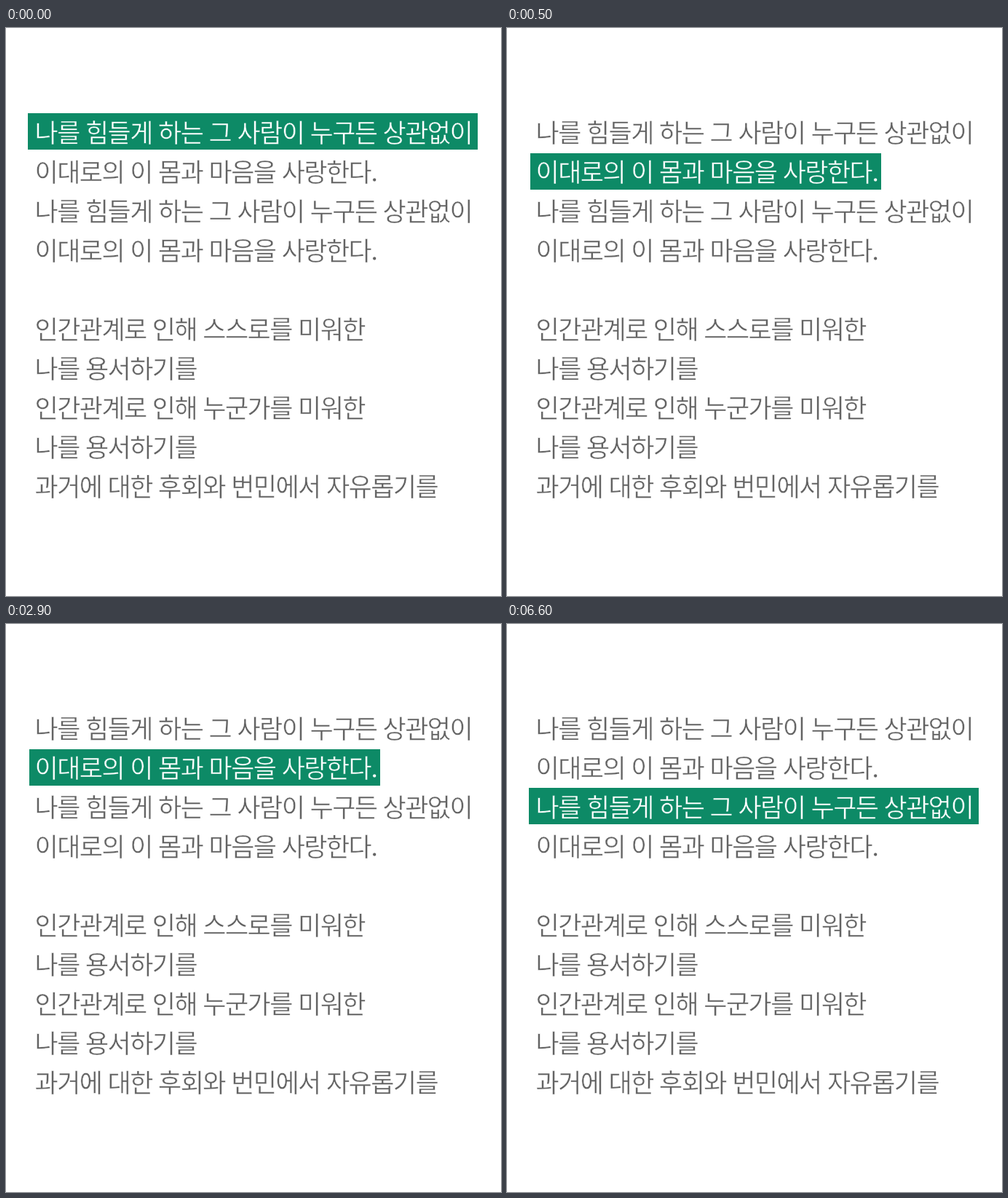
An HTML page that plays this animation: 680x780 px, repeating every 8 s.

```html
<!DOCTYPE html>
<html lang="ko">
<head>
<meta charset="utf-8">
<title>따라 읽기</title>
<style>
  html, body { margin: 0; width: 100%; height: 100%; overflow: hidden; background: #fff; }
  svg { display: block; width: 680px; height: 780px; --paper: #fff; --ink: #636363; }
  g { --paper: #0d8a66; --ink: #fff; }
  /* The paper-coloured outline thins the letters to a lighter weight. */
  text {
    font: 300 35px "Noto Sans CJK KR", "Noto Sans CJK", "Noto Sans KR", sans-serif;
    letter-spacing: -0.045em;
    fill: var(--ink);
    stroke: var(--paper);
    stroke-width: 0.45px;
  }
  rect { fill: var(--paper); }
</style>
</head>
<body>
<svg id="stage" viewBox="0 0 680 780"></svg>
<script>
const LOOP = 8000, LEFT = 39.5, FIRST_BASELINE = 156.6, LINE_HEIGHT = 54;
const lines = [
  '나를 힘들게 하는 그 사람이 누구든 상관없이',
  '이대로의 이 몸과 마음을 사랑한다.',
  '나를 힘들게 하는 그 사람이 누구든 상관없이',
  '이대로의 이 몸과 마음을 사랑한다.',
  '',
  '인간관계로 인해 스스로를 미워한',
  '나를 용서하기를',
  '인간관계로 인해 누군가를 미워한',
  '나를 용서하기를',
  '과거에 대한 후회와 번민에서 자유롭기를',
];
const highlights = [
  { line: 0, from: 0, to: 500, x: 30, y: 117, width: 618 },
  { line: 1, from: 500, to: 4500, x: 32, y: 172, width: 482 },
  { line: 2, from: 4500, to: 8000, x: 30, y: 225, width: 618 },
];

function add(parent, tag, attrs = {}, text = '') {
  const node = document.createElementNS('http://www.w3.org/2000/svg', tag);
  for (const [name, value] of Object.entries(attrs)) node.setAttribute(name, value);
  node.textContent = text;
  return parent.appendChild(node);
}

function addLine(parent, index) {
  add(parent, 'text', { x: LEFT, y: FIRST_BASELINE + index * LINE_HEIGHT }, lines[index]);
}

const stage = document.getElementById('stage');
lines.forEach((_, index) => addLine(stage, index));

const groups = highlights.map(({ line, x, y, width }) => {
  const group = add(stage, 'g');
  add(group, 'rect', { x, y, width, height: 50 });
  addLine(group, line);
  return group;
});

groups.forEach((group, i) => {
  const { from, to } = highlights[i];
  const step = (time, opacity) => ({ offset: time / LOOP, opacity, easing: 'step-end' });
  const frames = [step(from, 1), step(to, to < LOOP ? 0 : 1)];
  if (from > 0) frames.unshift(step(0, 0));
  if (to < LOOP) frames.push(step(LOOP, 0));
  group.animate(frames, { duration: LOOP, iterations: Infinity }).startTime = 0;
});
</script>
</body>
</html>
```
